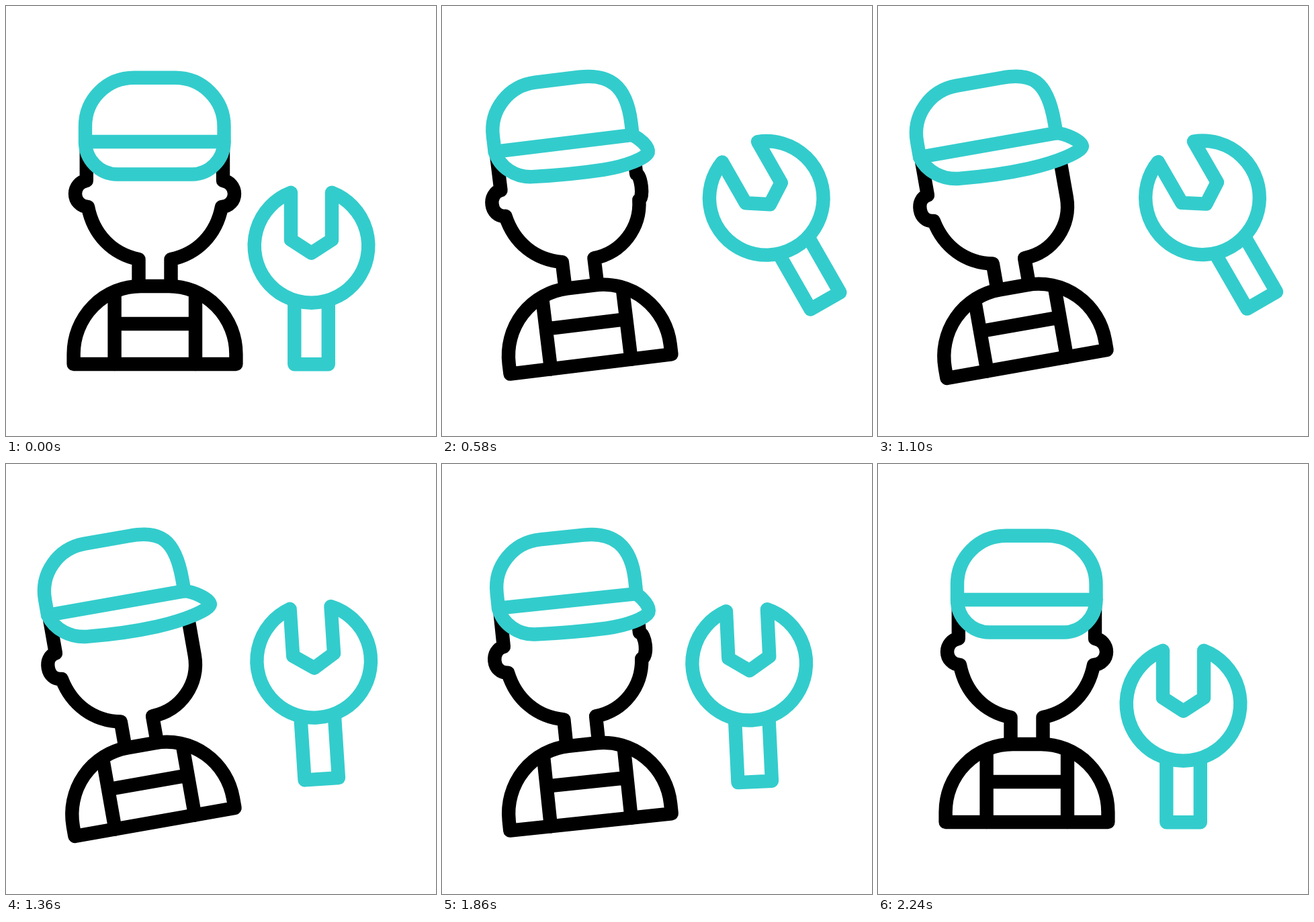
These frames come from a looping animation (640x640 px, 2400 ms). An HTML page with a canvas:

```html
<!DOCTYPE html>
<html>
<head>
<meta charset="utf-8">
<title>Mechanic with wrench</title>
<style>
html, body { margin: 0; width: 100%; height: 100%; overflow: hidden; background: #fff; }
canvas { display: block; width: 100vmin; height: 100vmin; margin: 0 auto; }
</style>
</head>
<body>
<canvas id="stage"></canvas>
<script>
const canvas = document.getElementById('stage');
const ctx = canvas.getContext('2d');
const SIZE = 640, LOOP = 2400, STEP = 20;
const TEAL = '#33cccc', BLACK = '#000', LINE = 20.4;
const TILT = 10, LIFT = 64;

// Keys are [time, value] pairs, eased in and out between neighbours.
const turnKeys = [[200, 0], [800, 1], [1600, 1], [2200, 0]];
const liftKeys = [[200, 0], [600, 1], [1800, 1], [2200, 0]];
const swingKeys = [
  [200, 0], [600, -30], [855, -3.7], [1100, -30],
  [1355, -3.7], [1600, -30], [1850, -2.75], [2240, 0]
];

const mix = (a, b, m) => a + (b - a) * m;
const rad = deg => deg * Math.PI / 180;

function valueAt(keys, t) {
  if (t <= keys[0][0]) return keys[0][1];
  for (let i = 1; i < keys.length; i++) {
    const [t0, a] = keys[i - 1], [t1, b] = keys[i];
    if (t < t1) {
      const u = (t - t0) / (t1 - t0);
      return mix(a, b, u * u * (3 - 2 * u));
    }
  }
  return keys[keys.length - 1][1];
}

function rotateAbout(x, y, deg) {
  ctx.translate(x, y);
  ctx.rotate(rad(deg));
  ctx.translate(-x, -y);
}

function stroke(d, color) {
  ctx.strokeStyle = color;
  ctx.stroke(new Path2D(d));
}

function drawTorso() {
  stroke('M100.6 533V518A100 101 0 0 1 200.6 417H242.4A100 101 0 0 1 342.4 518V533Z', BLACK);
  stroke('M161.6 428V533M282 428V533M161.6 473H282', BLACK);
}

function drawHead(m) {
  const v = (a, b) => mix(a, b, m);
  const earL = v(103, 105), earR = v(340, 323);
  const top = 210 + 30 * Math.min(1, m / 0.07);
  stroke(`M119.8 210V260
    C110 261 ${earL} 270 ${earL} 279.5
    C${earL} 290 111 298.5 122 299
    C130 340 158 369 197.5 377V412`, BLACK);
  stroke(`M323 ${top}V260
    C${v(333, 323)} 261 ${earR} 270 ${earR} 279.5
    C${earR} 290 ${v(332, 323)} 298.5 ${v(321, 323)} 299
    C${v(313, 323)} ${v(340, 341)} ${v(285, 289)} ${v(369, 376)} 245.5 377V412`, BLACK);
}

function drawCap(m) {
  const p = (x0, y0, x1, y1) => `${mix(x0, x1, m)} ${mix(y0, y1, m)} `;
  const cap = new Path2D(`M118 202V179C118 139 150 106.8 190.5 106.8
    L${p(252, 106.8, 258, 106.8)}
    C${p(292, 106.8, 304, 106.8)} ${p(324.5, 139, 324.5, 122)} ${p(324.5, 179, 324.5, 185)}
    L324.5 202
    C${p(324.5, 215, 337, 205)} ${p(319.4, 227.3, 359, 219)} ${p(310.4, 236.3, 359, 228)}
    C${p(301.6, 245.2, 357, 236)} ${p(289.8, 250.5, 318, 245)} ${p(277, 250.5, 275, 247)}
    C${p(240, 250.5, 240, 248.5)} ${p(203, 250.5, 205, 247)} ${p(165.5, 250.5, 170, 243.5)}
    C${p(139, 250.5, 146, 241)} ${p(118, 228.5, 124, 225)} 118 202Z`);
  ctx.fillStyle = '#fff';
  ctx.fill(cap);
  ctx.strokeStyle = TEAL;
  ctx.stroke(cap);
  stroke('M118 202H324.5', TEAL);
}

function drawWrench() {
  stroke(`M424 277.8V348L454.5 367.7L485 348V277.8
    A84.8 84.8 0 1 1 424 277.8Z`, TEAL);
  stroke('M429.3 440V533.3H479.8V440', TEAL);
}

function draw(t) {
  const m = valueAt(turnKeys, t);
  const scale = canvas.width / SIZE;
  ctx.setTransform(scale, 0, 0, scale, 0, 0);
  ctx.fillStyle = '#fff';
  ctx.fillRect(0, 0, SIZE, SIZE);
  ctx.lineWidth = LINE;
  ctx.lineCap = ctx.lineJoin = 'round';

  ctx.save();
  rotateAbout(221.5, 533, -TILT * m);
  drawTorso();
  drawHead(m);
  drawCap(m);
  ctx.restore();

  ctx.save();
  ctx.translate(0, -LIFT * valueAt(liftKeys, t));
  rotateAbout(454.5, 300, valueAt(swingKeys, t));
  drawWrench();
  ctx.restore();
}

function resize() {
  const side = Math.min(innerWidth, innerHeight) || SIZE;
  canvas.width = canvas.height = Math.round(side * (devicePixelRatio || 1));
}

const start = performance.now();
function tick() {
  const t = (performance.now() - start) % LOOP;
  draw(Math.floor(t / STEP) * STEP);
  requestAnimationFrame(tick);
}

addEventListener('resize', resize);
resize();
tick();
</script>
</body>
</html>
```
